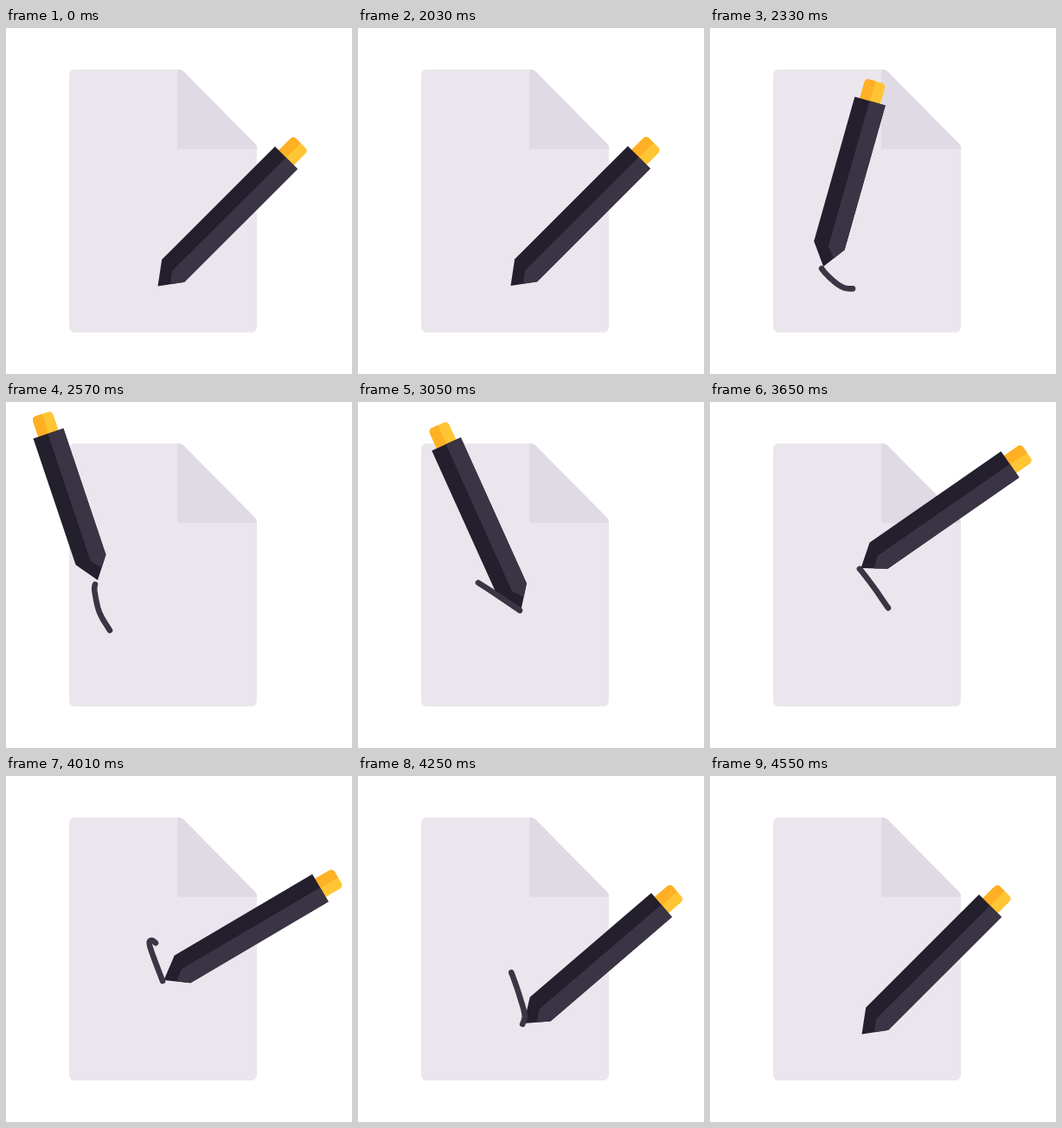
An HTML page with a canvas that plays this animation: 400 px wide and 400 px high, repeating every 4580 ms.

```html
<!DOCTYPE html>
<html lang="en">
<head>
<meta charset="utf-8">
<title>Writing pen</title>
<style>
  html, body { margin: 0; width: 100%; height: 100%; overflow: hidden; background: #fff; }
  canvas { display: block; width: 400px; height: 400px; }
</style>
</head>
<body>
<canvas id="stage" width="400" height="400"></canvas>
<script>
const ctx = document.getElementById('stage').getContext('2d');
const LOOP = 4580, HOLD = 2030, STEP = 30;
const INK = '#3b3444', SHADE = '#231f2d', PAPER = '#ebe6ed', FOLD = '#e0dae4';
const GOLD = '#ffc534', AMBER = '#ffb024';

// Tracks: [time, value...]
const strokePath = [
  [2000, 174, 299.5], [2030, 175, 299], [2120, 168, 301.3], [2220, 152, 299],
  [2310, 133, 283], [2380, 120, 264], [2460, 108, 243], [2540, 102.5, 219],
  [2570, 103, 211], [2630, 110, 200], [2690, 120, 199], [2780, 139, 209],
  [2900, 162, 224], [3050, 187, 241], [3110, 198, 249], [3170, 208, 254.5],
  [3240, 216, 255], [3320, 216, 249], [3410, 206, 238], [3530, 190, 215],
  [3650, 173, 193], [3690, 168.5, 190], [3740, 165.8, 192], [3800, 167, 199],
  [3900, 173, 216], [4010, 181, 237], [4080, 187, 255], [4160, 192.5, 275],
  [4230, 191, 285], [4310, 187, 291], [4420, 180, 296.5], [4550, 174, 299.5]
];
const tilt = [
  [2000, 45], [2030, 45], [2120, 42], [2260, 27], [2400, 4], [2540, -15],
  [2570, -18.6], [2630, -24.5], [2700, -28], [2900, -29.5], [3050, -24.3],
  [3080, -20.5], [3230, 2], [3380, 29], [3530, 48], [3650, 55.2],
  [3800, 60], [4010, 59.5], [4160, 52.5], [4280, 48.5], [4400, 46], [4550, 45]
];
const squash = [
  [2030, 0], [2300, 0.3], [2540, 0.97], [2600, 1], [2720, 0.9], [3050, 0]
];
// Time at which the pen passed the point where the trail now ends
const tailTime = [
  [2030, 2030], [2250, 2080], [2540, 2355], [2570, 2380], [3050, 2780],
  [3650, 3410], [4010, 3650], [4160, 3810], [4350, 4150], [4550, 4550]
];

// Smooth interpolation through the keys of a track
function at(track, t, col = 1) {
  const last = track.length - 1;
  if (t <= track[0][0]) return track[0][col];
  if (t >= track[last][0]) return track[last][col];
  let i = 0;
  while (track[i + 1][0] <= t) i++;
  const slope = k => {
    if (k === 0 || k === last) return 0;
    const a = track[k - 1], b = track[k + 1];
    return (b[col] - a[col]) / (b[0] - a[0]);
  };
  const p = track[i], q = track[i + 1], span = q[0] - p[0];
  const u = (t - p[0]) / span, v = 1 - u;
  return v * v * (1 + 2 * u) * p[col] + u * u * (3 - 2 * u) * q[col]
    + span * u * v * (v * slope(i) - u * slope(i + 1));
}

function fillPoly(color, points) {
  ctx.fillStyle = color;
  ctx.beginPath();
  points.forEach(([x, y]) => ctx.lineTo(x, y));
  ctx.closePath();
  ctx.fill();
}

function drawPaper() {
  const sheet = new Path2D('M80 48H200Q203 48 205 50L288 134Q290 136 290 139V345'
    + 'Q290 352 283 352H80Q73 352 73 345V55Q73 48 80 48Z');
  ctx.fillStyle = PAPER;
  ctx.fill(sheet);
  ctx.fillStyle = FOLD;
  ctx.fill(new Path2D('M198 48H200Q203 48 205 50L288 134Q290 136 290 140H201Q198 140 198 137Z'));
}

// Nib at the origin, barrel pointing up
function drawPen(x, y, degrees, length) {
  const half = 18.4, neck = -25, top = neck - length, capEnd = top - 24;
  ctx.save();
  ctx.translate(x, y);
  ctx.rotate(degrees * Math.PI / 180);

  ctx.save();
  ctx.beginPath();
  ctx.roundRect(-12.3, capEnd, 24.6, 34, 5);
  ctx.clip();
  ctx.fillStyle = GOLD;
  ctx.fillRect(-13, capEnd, 26, 34);
  ctx.fillStyle = AMBER;
  ctx.fillRect(-13, capEnd, 13, 34);
  ctx.restore();

  fillPoly(SHADE, [[0, 0], [-half, neck], [-half, top], [half, top], [half, neck]]);
  fillPoly(INK, [[-0.5, top], [half, top], [half, neck], [8.8, -12], [-0.8, neck + 1]]);
  ctx.restore();
}

function drawTrail(from, to) {
  if (to - from < 1) return;
  const pieces = Math.ceil((to - from) / 6);
  ctx.strokeStyle = INK;
  ctx.lineWidth = 6.6;
  ctx.lineCap = ctx.lineJoin = 'round';
  ctx.beginPath();
  for (let i = 0; i <= pieces; i++) {
    const t = from + (to - from) * i / pieces;
    ctx.lineTo(at(strokePath, t, 1), at(strokePath, t, 2));
  }
  ctx.stroke();
}

function render(now) {
  const clock = now % LOOP;
  const t = clock < HOLD ? 2000 : HOLD + Math.floor((clock - HOLD) / STEP) * STEP;
  const k = at(squash, t);
  const x = at(strokePath, t, 1) + 1.5 + 1.5 * k;
  const y = at(strokePath, t, 2) - 1 - 4 * k;
  ctx.fillStyle = '#fff';
  ctx.fillRect(0, 0, 400, 400);
  drawPaper();
  drawPen(x, y, at(tilt, t), 185 - 31 * k);
  if (t > HOLD) drawTrail(at(tailTime, t), t);
}

const start = performance.now();
function tick() {
  render(performance.now() - start);
  requestAnimationFrame(tick);
}
tick();
</script>
</body>
</html>
```
